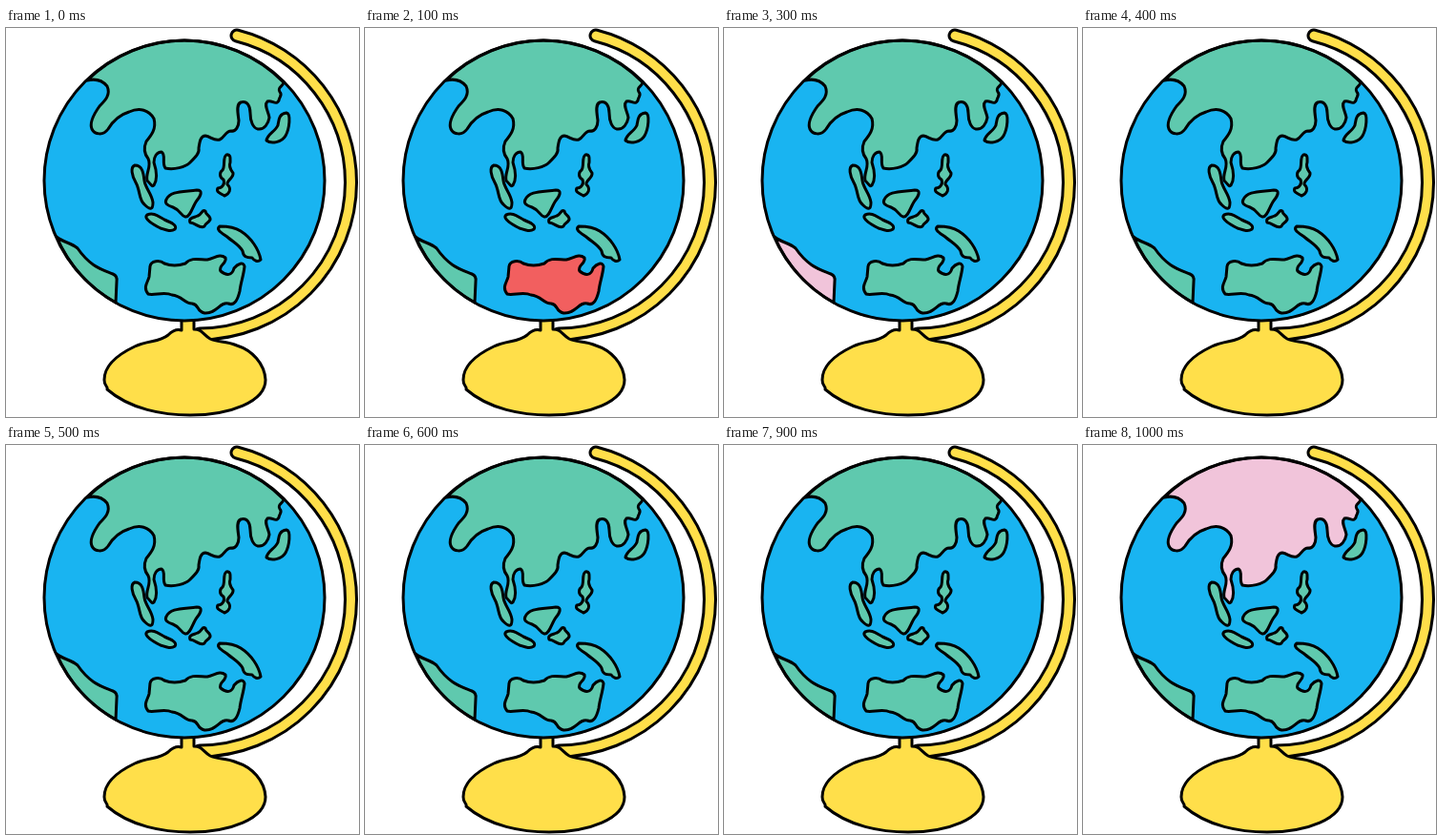
These frames come from a looping animation (370 px wide and 408 px high, 1.1 s). An HTML page:

```html
<!DOCTYPE html>
<html lang="en">
<head>
<meta charset="utf-8">
<title>Globe</title>
<style>
html, body { margin: 0; width: 100%; height: 100%; overflow: hidden; background: #fff; }
svg { display: block; width: 370px; height: 408px; }
.line { stroke: #000; stroke-width: 3; stroke-linejoin: round; stroke-linecap: round; }
.arm { fill: none; stroke: #000; stroke-width: 15; stroke-linecap: round; }
.arm.inner { stroke: #ffdf4a; stroke-width: 9; }
.base { fill: #ffdf4a; }
.land { fill: #5fc9ae; }
</style>
</head>
<body>
<svg viewBox="0 0 370 408">
  <!-- stand -->
  <path class="arm" d="M242 8A159 159 0 0 1 361.5 162A159 159 0 0 1 203 321"/>
  <path class="arm inner" d="M242 8A159 159 0 0 1 361.5 162A159 159 0 0 1 203 321"/>
  <path class="line base" d="M184 304V317C178 315 174 318 170 322C160 330 150 327 135 334C116 343 103 354 103 369C103 377 107 375 106 379C130 400 165 406 193 406C235 406 272 392 272 369C271 352 258 338 242 333C230 328 222 330 214 326C206 321 206 316 197 316V304"/>

  <circle cx="187" cy="160" r="147" fill="#19b4f1"/>
  <g class="line land">
    <path id="asia" d="M85 55C93 53 101 55 106 61C110 70 104 76 98 82C93 89 87 99 90 106C93 112 102 113 107 106C113 96 119 91 129 88C140 83 150 86 155 95C158 106 152 113 147 119C144 126 145 132 149 137C153 145 146 152 148 160C152 164 153 167 155 165C160 157 157 147 155 141C155 135 158 130 163 130C168 133 163 141 167 147C176 149 188 146 193 141C199 135 203 131 202 126C203 119 204 113 209 113C215 114 218 119 224 117C229 115 230 108 236 108C241 109 244 103 244 97C243 89 241 80 246 78C253 76 256 82 256 89C256 98 259 105 264 106C271 107 275 100 276 94C275 87 270 81 274 77C279 75 283 82 286 76C287 71 290 70 287 67C284 62 290 62 291 57A147 147 0 0 0 187 13A147 147 0 0 0 85 55Z"/>
    <path id="africa" d="M53 219C60 225 68 225 75 231C88 250 100 253 112 258Q117 260 116 266L115 288A147 147 0 0 1 53 219Z"/>
    <path id="australia" d="M151 250C152 244 161 243 166 247C174 250 182 249 188 247C194 240 203 243 211 243C218 242 224 236 230 241C232 247 222 249 225 255C231 260 237 260 239 252C243 247 249 245 250 250C249 260 246 267 245 276C243 284 240 292 233 289C224 287 221 300 208 299C199 297 203 290 195 289C187 289 185 281 174 280C166 276 155 281 149 279C143 272 149 266 150 261Z"/>
    <path d="M294 89C286 90 286 96 285 102C282 109 274 111 273 118C278 122 289 120 293 113C297 106 299 90 294 89Z"/>
    <path d="M231 133C236 132 235 137 235 141C233 146 236 149 238 152C239 157 231 160 232 164C237 169 234 174 229 176C224 173 220 172 222 168C226 168 230 164 228 159C223 156 224 151 227 149C230 145 227 135 231 133Z"/>
    <path d="M135 144C143 144 144 152 145 160C146 168 153 174 154 183C154 191 151 191 145 185C139 180 141 171 136 162C132 155 130 146 135 144Z"/>
    <path d="M168 180C172 171 184 172 200 170C207 170 204 176 200 181C196 186 193 199 188 198C183 197 183 191 175 188C169 186 166 184 168 180Z"/>
    <path d="M148 196C155 193 160 198 166 201C173 204 180 207 177 211C173 214 168 212 162 210C156 207 143 200 148 196Z"/>
    <path d="M193 204C191 199 197 199 201 197C206 195 205 190 209 192C209 196 215 197 214 201C212 205 209 204 208 208C203 211 200 205 193 204Z"/>
    <path d="M224 208C232 208 240 209 246 213C257 220 265 232 267 243C264 246 260 244 258 241C252 241 249 240 248 234C245 228 239 225 233 220C228 216 219 212 224 208Z"/>
  </g>
  <circle class="line" cx="187" cy="160" r="147" fill="none"/>
</svg>
<script>
const LOOP = 1100, STEP = 100;
// Each continent flashes for one step, starting at the given step.
const flashes = [
  { id: "australia", step: 1, color: "#f25f5f" },
  { id: "africa", step: 3, color: "#f1c4da" },
  { id: "asia", step: 10, color: "#f1c4da" },
];
const start = performance.now();

function draw() {
  const step = Math.floor((performance.now() - start) % LOOP / STEP);
  for (const flash of flashes)
    document.getElementById(flash.id).style.fill = step === flash.step ? flash.color : "";
  requestAnimationFrame(draw);
}
draw();
</script>
</body>
</html>
```
